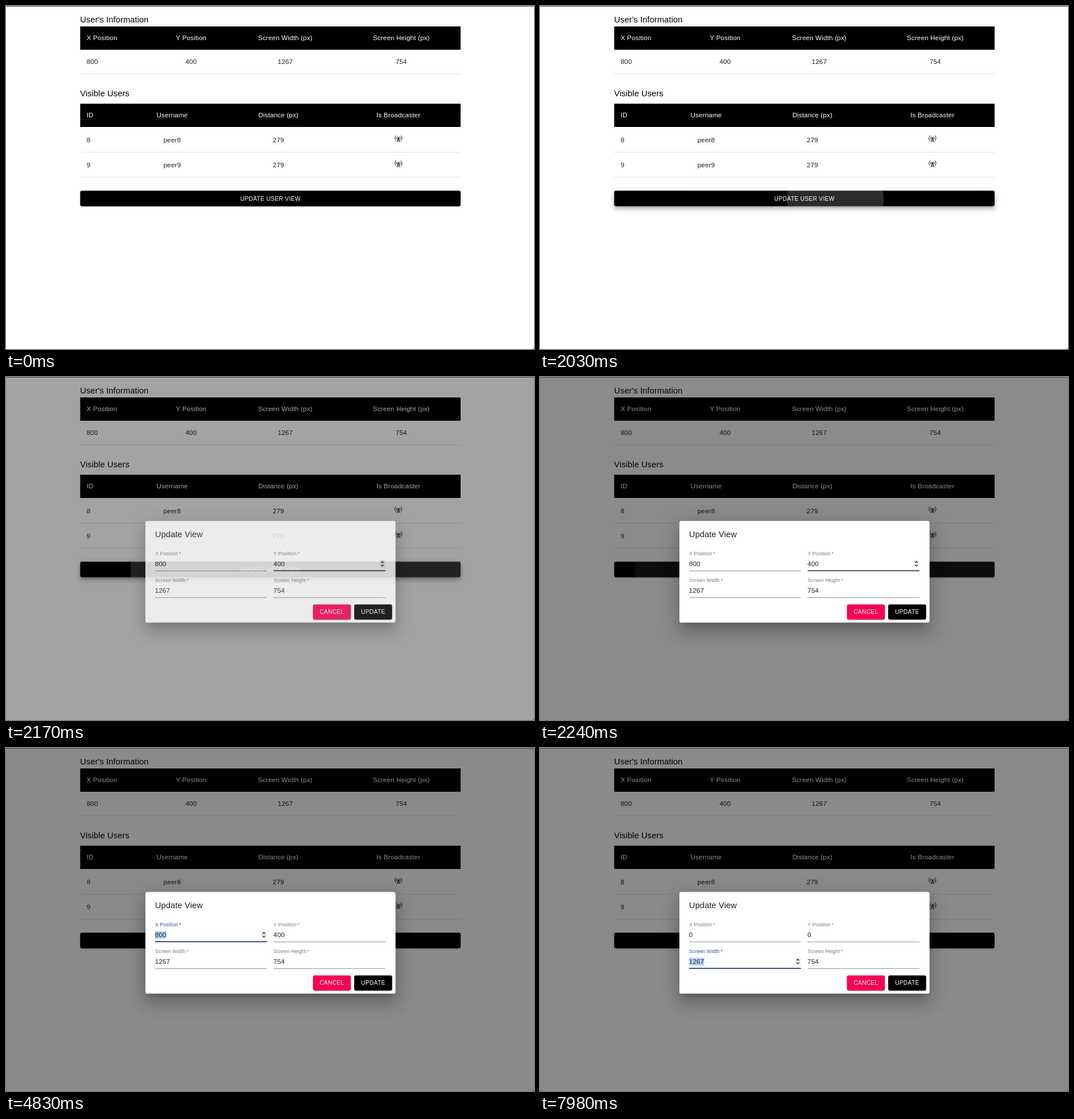
An HTML page that plays this animation: 928x604 px, repeating every 8 s.

```html
<!DOCTYPE html>
<html lang="en">
<head>
<meta charset="utf-8">
<title>Update view</title>
<style>
  html, body { margin: 0; width: 100%; height: 100%; overflow: hidden; background: #fff; }
  svg { display: block; width: 928px; height: 604px; }
  text { font-family: "Liberation Sans", Arial, sans-serif; font-size: 11.72px; letter-spacing: .00938em; fill: #212121; }
  .title { font-size: 14.65px; letter-spacing: .0075em; fill: #000; }
  .head { fill: #fff; }
  .mid { text-anchor: middle; }
  .label { font-size: 8.79px; }
  .button { font-size: 10.25px; letter-spacing: .02857em; fill: #fff; text-anchor: middle; }
</style>
</head>
<body>
<svg id="stage" viewBox="0 0 928 604"></svg>
<script>
const STEP = 70, LOOP = 8000, SCALE = 0.7324;
const BLUE = [54, 72, 172], GRAY = [122, 122, 122];

const clamp = v => Math.max(0, Math.min(1, v));
const ease = v => 1 - (1 - clamp(v)) ** 3;
const within = (t, [a, b]) => t >= a && t < b;

// Piecewise linear value through [time, value] points.
function track(t, points) {
  if (t <= points[0][0]) return points[0][1];
  for (let i = 1; i < points.length; i++) {
    const [a, v] = points[i - 1], [b, w] = points[i];
    if (t <= b) return v + (w - v) * (t - a) / (b - a);
  }
  return points[points.length - 1][1];
}

// 0..1 level of a 200 ms transition that is on during the given spans.
const level = (t, spans) => Math.max(0, ...spans.map(([a, b]) =>
  t < a ? 0 : t < b ? ease((t - a + 60) / 200) : 1 - ease((t - b + 60) / 200)));

const rect = (x, y, w, h, fill, extra = "") =>
  `<rect x="${x}" y="${y}" width="${w}" height="${h}" fill="${fill}" ${extra}/>`;
const text = (x, y, value, cls = "", extra = "") =>
  `<text x="${x}" y="${y}" class="${cls}" ${extra}>${value}</text>`;

// Layers are [offset, blur, spread, alpha] in unscaled pixels.
const ELEVATION = {
  2: [[3, 1, -2, .2], [2, 2, 0, .14], [1, 5, 0, .12]],
  4: [[2, 4, -1, .2], [4, 5, 0, .14], [1, 10, 0, .12]],
  8: [[5, 5, -3, .2], [8, 10, 1, .14], [3, 14, 2, .12]],
  24: [[11, 15, -7, .2], [24, 38, 3, .14], [9, 46, 8, .12]]
};
const shadow = (x, y, w, h, depth) => ELEVATION[depth].map(([dy, blur, spread, alpha]) => {
  const s = spread * SCALE;
  return rect(x - s, y - s + dy * SCALE, w + 2 * s, h + 2 * s, "#000",
    `rx="3" opacity="${alpha}" style="filter:blur(${blur * SCALE / 2}px)"`);
}).join("");

const button = (x, y, w, h, fill, label) =>
  shadow(x, y, w, h, 2) + rect(x, y, w, h, fill, 'rx="3"') + text(x + w / 2, y + 16.7, label, "button");

const tower = (x, y) => `<g transform="translate(${x} ${y})" fill="none" stroke="#111" stroke-width="1">
  <path d="M-2.2-2.5A3.3 3.3 0 0 0-2.2 2.3M2.2-2.5A3.3 3.3 0 0 1 2.2 2.3"/>
  <path d="M-4.2-4.6A6.2 6.2 0 0 0-4.2 4.4M4.2-4.6A6.2 6.2 0 0 1 4.2 4.4"/>
  <path d="M-2.8 7.2L0 0L2.8 7.2M-1.8 4.6H1.8"/><circle r="1.1" fill="#111"/></g>`;

const LEFT = 130.4, WIDTH = 668.6;
const row = (y, cells, centers, cls) => cells.map((cell, i) =>
  i ? text(centers[i], y, cell, cls + " mid") : text(141.7, y, cell, cls)).join("");
const header = (y, cells, centers) => rect(LEFT, y, WIDTH, 41, "#000") + row(y + 24.4, cells, centers, "head");
const rule = y => rect(LEFT, y, WIDTH, 1, "#e0e0e0");

const INFO = [0, 325.4, 490.8, 694.7], USERS = [0, 292, 478.7, 689.6];
const page = `
  ${rect(0, 0, 928, 604, "#fff")}
  ${text(130.3, 28.8, "User's Information", "title")}
  ${header(36, ["X Position", "Y Position", "Screen Width (px)", "Screen Height (px)"], INFO)}
  ${row(102.2, ["800", "400", "1267", "754"], INFO, "")}${rule(119)}
  ${text(130.3, 159.3, "Visible Users", "title")}
  ${header(172, ["ID", "Username", "Distance (px)", "Is Broadcaster"], USERS)}
  ${row(240.2, ["8", "peer8", "279"], USERS, "")}${tower(689.8, 232.8)}${rule(257)}
  ${row(284.2, ["9", "peer9", "279"], USERS, "")}${tower(689.8, 276.8)}${rule(301)}
  ${[2, 4, 8].map(d => `<g id="lift${d}">${shadow(LEFT, 325.3, WIDTH, 27.2, d)}</g>`).join("")}
  ${rect(LEFT, 325.3, WIDTH, 27.2, "#000", 'rx="3"')}
  <clipPath id="buttonShape">${rect(LEFT, 325.3, WIDTH, 27.2, "#000", 'rx="3"')}</clipPath>
  <g clip-path="url(#buttonShape)"><circle id="ripple" cx="519" cy="339" fill="#fff"/></g>
  ${text(464.7, 342.6, "UPDATE USER VIEW", "button")}
  ${rect(926.5, 603, 1.5, 1, "#333")}
  ${rect(0, 1, 928, 603, "#000", 'id="backdrop"')}
  ${rect(0, 0, 928, 1, "#4a4a4a")}`;

const fields = [
  { label: "X Position", x: 262, y: 341, text: "800", typed: 5460,
    hover: [[2940, 5950]], focus: [3150, 6300],
    select: [[3640, 4130, 1], [4130, 5460, 0]], caret: [[3150, 3640], [5460, 5950]] },
  { label: "Y Position", x: 470.3, y: 341, text: "400", typed: 7070,
    hover: [[-1000, 2660], [5950, 7420]], focus: [6300, 7770],
    select: [[6510, 7070, 0]], caret: [[6300, 6510], [7070, 7560]] },
  { label: "Screen Width", x: 262, y: 388, text: "1267", typed: Infinity,
    hover: [[7420, 9000]], focus: [7770, 9000],
    select: [[7910, 9000, 0]], caret: [[7770, 7910]] },
  { label: "Screen Height", x: 470.3, y: 388, text: "754", typed: Infinity,
    hover: [], focus: [9000, 9000], select: [], caret: [] }
];
const FIELD_WIDTH = 196.5, DIGIT = 6.62;

function spinner(x, y) {
  const c = x + FIELD_WIDTH - 5.3;
  return rect(c - 4.8, y - 19, 9.8, 13.8, "#efefef", 'rx="2"') +
    `<path d="M${c - 2.2} ${y - 13.8}l2.2-2.5l2.2 2.5M${c - 2.2} ${y - 10.4}l2.2 2.5l2.2-2.5"
      fill="none" stroke="#222" stroke-width="1.3"/>`;
}

function drawField(f, t) {
  const hover = level(t, f.hover), focus = level(t, [f.focus]);
  const value = t >= f.typed ? "0" : f.text;
  const hovered = f.hover.some(span => within(t, span));
  const color = GRAY.map((g, i) => Math.round(g + (BLUE[i] - g) * focus));
  const selection = f.select.find(span => within(t, span));
  const half = FIELD_WIDTH / 2 * focus, center = f.x + FIELD_WIDTH / 2;
  let out = text(f.x, f.y - 26.6, f.label + "\u2009*", "label", `style="fill:rgb(${color})"`);
  if (selection) {
    const start = selection[2] * DIGIT;
    out += rect(f.x + start, f.y - 18.7, value.length * DIGIT - start, 13.7, "#b3d5fe");
  }
  out += text(f.x - .2, f.y - 7.8, value);
  if (f.caret.some(span => within(t, span)))
    out += rect(f.x + value.length * DIGIT, f.y - 18.5, .8, 13.3, "#000");
  out += rect(f.x, f.y - (hovered ? .6 : 0), FIELD_WIDTH, hovered ? 1.5 : 1, "#000", `opacity="${.42 + .45 * hover}"`);
  if (focus) out += rect(center - half, f.y - .7, 2 * half, 1.6, `rgb(${BLUE})`);
  if (hovered || within(t, f.focus)) out += spinner(f.x, f.y);
  return out;
}

const dialog = `<g id="dialog">
  ${shadow(245, 253.5, 439.6, 179, 24)}
  ${rect(245, 253.5, 439.6, 179, "#fff", 'rx="3"')}
  ${text(262, 281.8, "Update View", "title", 'style="fill:#212121"')}
  <g id="fields"></g>
  ${button(539.5, 400.5, 66.6, 26.4, "#f70058", "CANCEL")}
  ${button(612, 400.5, 66.6, 26.4, "#000", "UPDATE")}
</g>`;

const find = id => document.getElementById(id);
find("stage").innerHTML = page + dialog;
const show = (id, on) => find(id).setAttribute("visibility", on ? "visible" : "hidden");

function render(time) {
  const t = Math.floor(time / STEP) * STEP;
  const pressed = within(t, [1960, 2240]);
  const raised = within(t, [1610, 1960]);
  show("lift2", !pressed && !raised);
  show("lift4", raised);
  show("lift8", pressed);

  const ripple = find("ripple");
  ripple.setAttribute("r", track(t, [[1960, 10], [2030, 85], [2100, 234], [2170, 300], [2240, 352]]));
  ripple.setAttribute("opacity", track(t, [[1890, 0], [1960, .06], [2030, .17], [2100, .24], [2170, .21], [2240, .09], [2310, 0]]));

  find("backdrop").setAttribute("opacity", track(t, [[2030, 0], [2100, .15], [2170, .36], [2240, .455], [2310, .46]]));
  const opacity = track(t, [[2030, 0], [2100, .34], [2170, .8], [2240, 1]]);
  find("dialog").setAttribute("opacity", opacity);
  show("dialog", opacity > 0);
  find("fields").innerHTML = fields.map(f => drawField(f, t)).join("");
}

const begin = performance.now();
function tick() {
  render((performance.now() - begin) % LOOP);
  requestAnimationFrame(tick);
}
tick();
</script>
</body>
</html>
```
